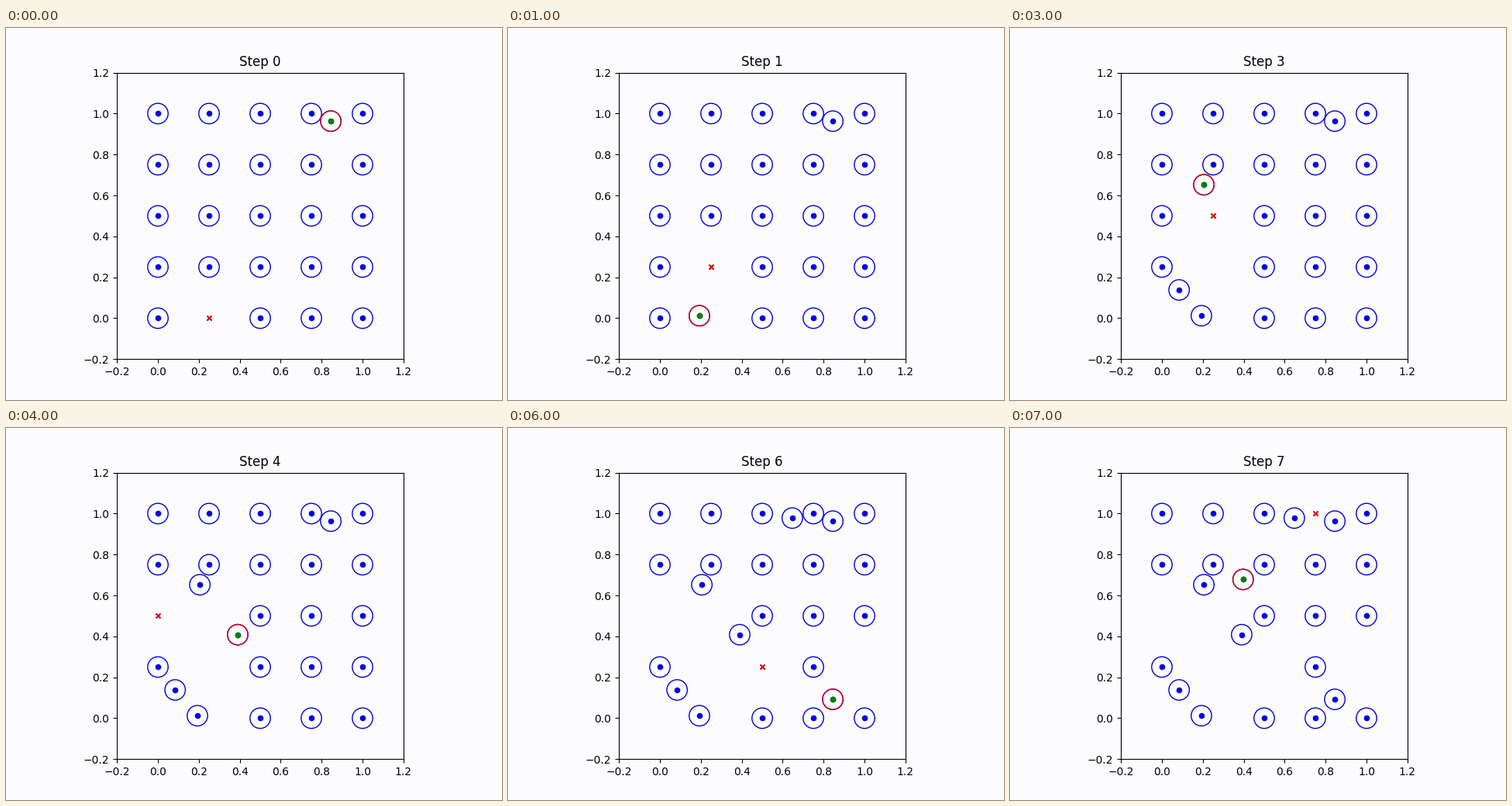
Write a matplotlib script that moves like this. It is 640x480 px and loops after 8 s.

```python
import itertools

import matplotlib.pyplot as plt
import numpy as np
from matplotlib.animation import FuncAnimation

BACKGROUND = "#fcfcfe"
BLUE, DARK_BLUE = "#0000e8", "#0000d4"
GREEN, RED = "#008200", "#d80008"
RADIUS = 0.05
DOT_AREA = 20

# A 5 by 5 lattice, numbered column by column from the bottom left.
LATTICE = list(itertools.product(np.linspace(0, 1, 5), repeat=2))

# In each step one lattice particle is picked and jumps to a free place.
PICKED = [5, 6, 0, 7, 2, 21, 11, 19]
LANDING = [(0.845, 0.963), (0.193, 0.012), (0.084, 0.138), (0.205, 0.652),
           (0.390, 0.408), (0.647, 0.978), (0.845, 0.092), (0.397, 0.678)]

fig, ax = plt.subplots(figsize=(6.4, 4.8), dpi=100, facecolor=BACKGROUND)


def particles_after(step):
    points = LATTICE.copy()
    for index, place in zip(PICKED[:step + 1], LANDING):
        points[index] = place
    return points


def draw_particle(point, dot_color, ring_color):
    ax.scatter(*point, s=DOT_AREA, color=dot_color)
    ax.add_patch(plt.Circle(point, RADIUS, fill=False, color=ring_color))


def draw_step(step):
    ax.clear()
    ax.set(facecolor=BACKGROUND, aspect="equal", xlim=(-0.2, 1.2),
           ylim=(-0.2, 1.2), title=f"Step {step}")

    for point in particles_after(step):
        draw_particle(point, BLUE, DARK_BLUE)
    ax.scatter(*LATTICE[PICKED[step]], s=DOT_AREA, marker="x", color=RED)
    draw_particle(LANDING[step], GREEN, RED)


anim = FuncAnimation(fig, draw_step, frames=len(PICKED), interval=1000,
                     init_func=lambda: draw_step(0), repeat=True,
                     repeat_delay=0)

plt.show()
```
